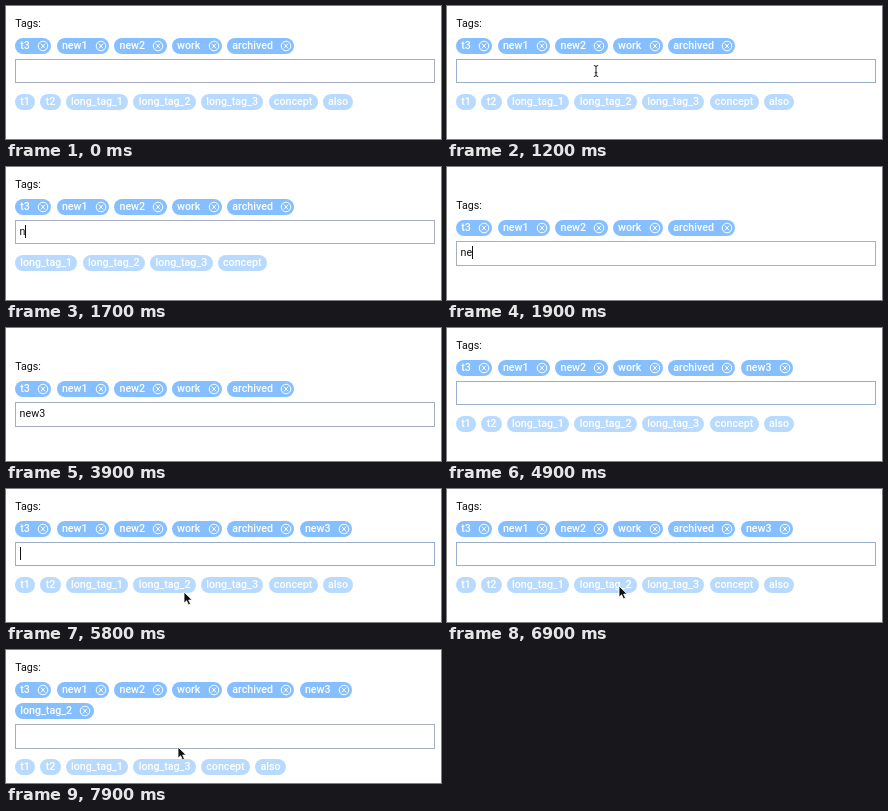
These frames come from a looping animation (435x133 px, 8 s). An HTML page:

```html
<!DOCTYPE html>
<html lang="en">
<head>
<meta charset="utf-8">
<title>Tag input</title>
<style>
  html, body { margin: 0; width: 100%; height: 100%; overflow: hidden; background: #fff; }
  #stage {
    position: relative; width: 435px; height: 133px; overflow: hidden;
    font: 10.67px/15.8px Roboto, Arial, sans-serif; color: #111;
  }
  #panel, #label, .tags, #field, #mouse { position: absolute; }
  #panel { left: 0; top: 0; width: 435px; }
  #label { left: 9.2px; top: 10.2px; }
  .tags {
    left: 9px; width: 419px; display: flex; flex-wrap: wrap;
    column-gap: 5.2px; row-gap: 5.5px;
  }
  #chosen { top: 31.8px; }
  .tag {
    display: flex; align-items: center; height: 15.8px; padding: 0 5.3px;
    border-radius: 8px; background: #85bfff; color: #fff;
    font-weight: 500; white-space: nowrap;
  }
  #hints .tag { background: #b8daff; }
  #chosen .tag { padding-right: 2.3px; }
  .tag svg { width: 12px; height: 12px; margin-left: 7.2px; fill: none; stroke: #fff; }
  #field {
    left: 9px; width: 419.5px; height: 24.3px; box-sizing: border-box;
    border: 1px solid #a8adbf; padding-left: 3.6px; line-height: 22.3px;
  }
  #field.ready { border-color: #98aecb; }
  #caret {
    display: inline-block; width: 1px; height: 12.6px; margin-right: -1px;
    vertical-align: -2.6px; background: #111;
  }
  #mouse { left: 0; top: 0; width: 12px; height: 18px; overflow: visible; }
</style>
</head>
<body>
<div id="stage">
  <div id="panel">
    <div id="label">Tags:</div>
    <div id="chosen" class="tags"></div>
    <div id="field"><span id="text"></span><span id="caret"></span></div>
    <div id="hints" class="tags"></div>
  </div>
  <svg id="mouse">
    <path id="arrow" d="M0 0V11.2L2.6 8.8L4.5 13L6.5 12.1L4.7 8.1H8.2Z" fill="#111" stroke="#fff" stroke-width=".8"/>
    <path id="beam" d="M-2.2 -5.5Q0 -5.5 0 -4Q0 -5.5 2.2 -5.5M0 -4V4M-2.2 5.5Q0 5.5 0 4Q0 5.5 2.2 5.5M-1.3 1.8H1.3" fill="none" stroke="#222"/>
  </svg>
</div>
<script>
  const LOOP = 8000, STEP = 100, ROW = 21.3;
  const ADDED = 4000, PICKED = 7000;
  const chosenTags = ['t3', 'new1', 'new2', 'work', 'archived'];
  const hintTags = ['t1', 't2', 'long_tag_1', 'long_tag_2', 'long_tag_3', 'concept', 'also'];
  const typing = [[0, ''], [1700, 'n'], [1900, 'ne'], [2200, 'new'], [3400, 'new3'], [ADDED, '']];
  const caretOn = [[700, 1200], [1700, 2700], [3200, 3900], [4400, 4900], [5400, 5900], [6400, 6900]];

  // Each stroke is a list of [time, x, y]; the pointer is hidden between strokes.
  const strokes = [
    [[100, 172, 126], [300, 158, 92], [500, 150, 66], [900, 150, 66], [1000, 149, 65], [1700, 149, 65]],
    [[3100, 164, 65], [3200, 164, 65]],
    [[5400, 164, 67], [5700, 179, 105], [5800, 178, 103], [6100, 172, 97], [LOOP, 172, 97]]
  ];

  const $ = id => document.getElementById(id);
  const cross = '<svg viewBox="-6 -6 12 12"><circle r="4.8"/><path d="M-2 -2.3L2 2.3M2 -2.3L-2 2.3"/></svg>';
  const within = (t, [from, to]) => t >= from && t < to;

  function fill(box, names, extra = '') {
    const html = names.map(name => `<div class="tag">${name}${extra}</div>`).join('');
    if (box.markup !== html) box.innerHTML = box.markup = html;
  }

  function pointerAt(t) {
    const stroke = strokes.find(s => within(t, [s[0][0], s.at(-1)[0]]));
    if (!stroke) return null;
    const i = stroke.findIndex(p => p[0] > t);
    const [t0, x0, y0] = stroke[i - 1], [t1, x1, y1] = stroke[i];
    const k = (t - t0) / (t1 - t0);
    return [x0 + (x1 - x0) * k, y0 + (y1 - y0) * k];
  }

  function render(t) {
    const text = typing.findLast(([start]) => t >= start)[1];
    const picked = t >= PICKED;
    const chosen = [...chosenTags];
    if (t >= ADDED) chosen.push('new3');
    if (picked) chosen.push('long_tag_2');
    const hints = hintTags.filter(name => name.includes(text) && !chosen.includes(name));
    const panelTop = hints.length ? 0 : ROW;
    const fieldTop = picked ? 53.1 + ROW : 53.1;

    fill($('chosen'), chosen, cross);
    fill($('hints'), hints);
    $('panel').style.top = panelTop + 'px';
    $('field').style.top = fieldTop + 'px';
    $('hints').style.top = fieldTop + 35 + 'px';
    $('field').className = t >= 700 && !picked && !text ? 'ready' : '';
    $('text').textContent = text;
    $('caret').style.visibility = caretOn.some(span => within(t, span)) ? 'visible' : 'hidden';

    const pos = pointerAt(t);
    $('mouse').style.display = pos ? 'block' : 'none';
    if (!pos) return;
    const [x, y] = pos;
    const overText = within(y - panelTop - fieldTop, [2, 22]);
    $('mouse').style.transform = `translate(${x}px, ${y}px)`;
    $('beam').style.display = overText ? '' : 'none';
    $('arrow').style.display = overText ? 'none' : '';
  }

  const begin = performance.now();
  function tick() {
    const t = (performance.now() - begin) % LOOP;
    render(Math.floor(t / STEP) * STEP);
    requestAnimationFrame(tick);
  }
  tick();
</script>
</body>
</html>
```
